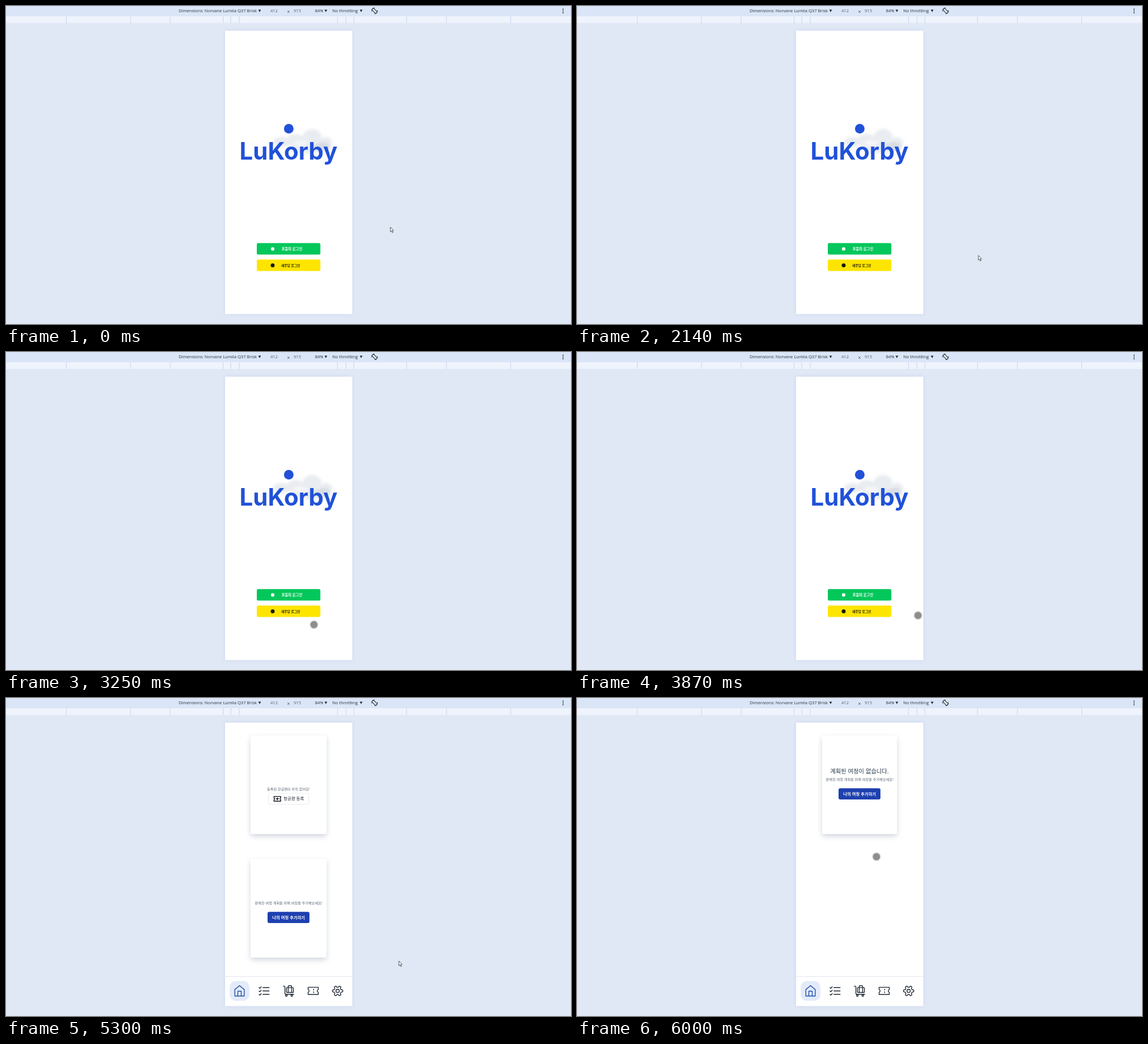
An HTML page for the animation above (6140 ms loop, 998 by 561 pixels).

```html
<!DOCTYPE html>
<html lang="ko">
<head>
<meta charset="utf-8">
<title>Travel app login</title>
<style>
  html, body { margin: 0; width: 100%; height: 100%; overflow: hidden; background: #e0e8f6; }
  svg { display: block; width: 100vw; height: 100vh; }
  text { font-family: "Noto Sans CJK KR", "Noto Sans CJK JP", sans-serif; }
  .bar text { font: 7.6px "Open Sans", "Noto Sans", sans-serif; fill: #2b3038; }
  .bar .dim { fill: #585d66; }
  .mid { text-anchor: middle; }
  .brand { font: 700 42px Inter, sans-serif; fill: #2051d8; text-anchor: middle; }
  .login { font-weight: 700; }
  .note { font-size: 6.22px; fill: #596473; text-anchor: middle; }
  .title { font-size: 10.3px; font-weight: 500; fill: #26364a; text-anchor: middle; }
  .cta { font-size: 7.3px; font-weight: 700; fill: #fff; text-anchor: middle; }
  .card { fill: #fff; filter: drop-shadow(0 4px 5px rgba(90, 108, 135, .28)); }
  .phone { fill: #fff; filter: drop-shadow(0 0 3px rgba(70, 100, 160, .13)); }
  .icon { fill: none; stroke: #1f2733; stroke-width: 1.4; stroke-linecap: round; stroke-linejoin: round; }
  .icon .on { stroke: #1f4ea6; }
  .cloud { filter: blur(2.6px); }
</style>
</head>
<body>
<svg viewBox="0 0 998 561" preserveAspectRatio="none">
  <defs>
    <path id="caret" d="M-2.4-2H2.4L0 2.2Z" fill="#23272e"/>
    <path id="ticket" d="M-9-6.3H9V-2.4a2.5 2.5 0 0 0 0 4.8V6.3H-9V2.4a2.5 2.5 0 0 0 0-4.8Z"/>
  </defs>

  <rect width="998" height="561" fill="#e0e8f6"/>
  <g class="bar">
    <rect width="998" height="18" fill="#dae6f7"/>
    <rect y="18" width="998" height="12" fill="#eff3fc"/>
    <path id="ticks" stroke="#c9d6ec" fill="none"/>
    <text x="305" y="11.3">Dimensions: Norvane Lumila Q37 Brisk</text>
    <text class="dim" x="467" y="11.3">412</text>
    <path d="M497 8l4 4m0-4l-4 4" stroke="#4c525b" stroke-width=".8"/>
    <text class="dim" x="508" y="11.3">915</text>
    <text x="545.7" y="11.3">84%</text>
    <text x="576.3" y="11.3">No throttling</text>
    <use href="#caret" x="448" y="8.5"/>
    <use href="#caret" x="565" y="8.5"/>
    <use href="#caret" x="627.3" y="8.5"/>
    <g transform="translate(651 8.5)" fill="none" stroke="#2f343c" stroke-width="1.1">
      <rect x="-2.2" y="-5" width="4.4" height="10" rx="1" transform="rotate(-45)"/>
      <path d="M-5 1A5.2 5.2 0 0 1 0-5.2M5-1A5.2 5.2 0 0 1 0 5.2"/>
    </g>
    <g fill="#23272e">
      <circle cx="984" cy="5.4" r="1"/><circle cx="984" cy="8.7" r="1"/><circle cx="984" cy="12" r="1"/>
    </g>
  </g>

  <rect class="phone" x="387" y="43.5" width="224.7" height="500"/>

  <g id="login">
    <g class="cloud">
      <g fill="#e9ecf0">
        <ellipse cx="487" cy="240" rx="15" ry="9"/>
        <ellipse cx="512" cy="237" rx="16" ry="11"/>
        <ellipse cx="541" cy="230" rx="16" ry="13"/>
        <ellipse cx="565" cy="241" rx="11" ry="10"/>
        <ellipse cx="535" cy="251" rx="32" ry="9"/>
      </g>
      <ellipse cx="559" cy="248" rx="14" ry="8" fill="#d7dce2"/>
      <ellipse cx="519" cy="242" rx="12" ry="5" fill="#f5f6f8"/>
    </g>
    <circle cx="499.5" cy="216.5" r="8.5" fill="#2051d8"/>
    <text class="brand" x="499" y="270.5">LuKorby</text>
    <rect x="443" y="418.3" width="112.3" height="20.3" rx="2.5" fill="#04c75b"/>
    <circle cx="471" cy="428.5" r="3.1" fill="#fff"/>
    <text class="login" x="486.7" y="430.7" font-size="6.3" fill="#fff">포들미 로그인</text>
    <rect x="443" y="447.3" width="112.3" height="20.2" rx="2.5" fill="#fee500"/>
    <circle cx="471" cy="457.6" r="3.5" fill="#1c1a06"/>
    <text class="login" x="486" y="459.5" font-size="5.8" fill="#2c2806">새루담 로그인</text>
  </g>

  <g id="home">
    <g id="flight">
      <rect class="card" x="432" y="66" width="134.3" height="174" rx="3"/>
      <text class="note" x="499" y="163.4">등록된 항공편이 아직 없어요!</text>
      <rect x="463.5" y="168" width="71.3" height="19.6" rx="3" fill="#fff" stroke="#e4e8ee" stroke-width=".9"/>
      <g class="icon" transform="translate(479.3 177.8) scale(.66)" style="stroke:#10151c;stroke-width:2.1">
        <use href="#ticket"/><path d="M-3 0H3M0-3V3"/>
      </g>
      <text x="490.3" y="180.3" font-size="7.4" font-weight="500" fill="#18202b">항공편 등록</text>
    </g>
    <g id="trip">
      <rect id="tripCard" class="card" y="66" height="174" rx="3"/>
      <text id="tripTitle" class="title" x="499" y="133.2">계획된 여정이 없습니다.</text>
      <text class="note" x="499.3" y="146">완벽한 여행 계획을 위해 여정을 추가해보세요!</text>
      <rect x="462" y="159.2" width="74" height="19.8" rx="3" fill="#1e40af"/>
      <text class="cta" x="499.2" y="171.7">나의 여정 추가하기</text>
    </g>
    <path d="M387 491.2H611.7" stroke="#dfe4ec"/>
    <rect x="395" y="499.3" width="35" height="35" rx="11" fill="#e3ebfa"/>
    <g class="icon">
      <path class="on" transform="translate(412.5 516.7)" d="M-8.3 9V-2.3L0-9.3 8.3-2.3V9ZM-3 9V.6H3V9"/>
      <path transform="translate(455.8 516.7)" d="M-2-6H9M-2 0H9M-2 6H9M-8.8-5.7l1.3 1.3 2.6-2.8M-8.8.3l1.3 1.3 2.6-2.8M-8.8 6.3l1.3 1.3 2.6-2.8"/>
      <g transform="translate(499 516.7)">
        <path d="M-9.2-8.3h1.6q1.2 0 1.2 1.2V4q0 2 2 2H9.2M-.5-5.8V-8q0-1.2 1.2-1.2h3.6q1.2 0 1.2 1.2v2.2M-.5-5.8V2.8M5.5-5.8V2.8"/>
        <rect x="-3.6" y="-5.8" width="12.2" height="8.6" rx="1"/>
        <circle cx="-3.8" cy="8" r="1.5"/><circle cx="5.8" cy="8" r="1.5"/>
      </g>
      <g transform="translate(542.6 516.7)">
        <use href="#ticket"/><path d="M.8-3V-1.6M.8 1.6V3"/>
      </g>
      <g transform="translate(585.8 516.7)"><path id="gear"/><circle r="2.9"/></g>
    </g>
  </g>

  <g id="touch">
    <circle r="7.4" fill="#c6c6c6"/><circle r="6" fill="#8d8d8d"/>
  </g>
  <path id="arrow" d="M0 0V8.3L1.9 6.6 3.3 9.8 4.7 9.2 3.3 6.1H5.6Z" fill="#fff" stroke="#2b2e35" stroke-width=".8" stroke-linejoin="round"/>
</svg>

<script>
const LOOP = 6140, HOME_AT = 5300, TRIP_AT = 5440;
const PHONE = { left: 387, right: 611, top: 43, bottom: 544 };
// pointer stops: time, x, y
const stops = [
  [0, 679, 390], [200, 679, 390], [750, 707, 394], [820, 707, 394],
  [960, 598, 424], [1100, 598, 424], [1650, 536, 430],
  [2140, 709, 440], [2280, 707, 447], [2350, 707, 447],
  [2840, 538, 502], [2970, 538, 502], [3250, 544, 481], [3460, 530, 466],
  [3590, 530, 466], [4200, 694, 463], [5230, 694, 463], [5300, 694, 464],
  [5860, 602, 422], [6000, 529, 280], [LOOP, 529, 280]
];
const el = id => document.getElementById(id);
const [login, home, flight, trip, tripCard, tripTitle, touch, arrow] =
  ["login", "home", "flight", "trip", "tripCard", "tripTitle", "touch", "arrow"].map(el);
const show = (node, on) => node.setAttribute("visibility", on ? "inherit" : "hidden");

el("ticks").setAttribute("d",
  [106.5, 220, 290, 383.5, 397, 412, 585.5, 600.5, 614.5, 707.5, 778, 891.5]
    .map(x => `M${x} 18V30`).join(""));

el("gear").setAttribute("d", "M" + Array.from({ length: 72 }, (_, i) => {
  const a = i * Math.PI / 36;
  const r = 7.7 + Math.max(-1.4, Math.min(1.4, 2.4 * Math.cos(6 * a)));
  return `${(r * Math.cos(a)).toFixed(2)} ${(r * Math.sin(a)).toFixed(2)}`;
}).join("L") + "Z");

function pointerAt(t) {
  const i = stops.findIndex(s => s[0] > t);
  const [t0, x0, y0] = stops[i - 1], [t1, x1, y1] = stops[i];
  const p = (t - t0) / (t1 - t0), e = p * p * (3 - 2 * p);
  return [x0 + (x1 - x0) * e, y0 + (y1 - y0) * e];
}

function draw(t) {
  const atHome = t >= HOME_AT, tripOnly = t >= TRIP_AT;
  show(login, !atHome);
  show(home, atHome);
  show(flight, !tripOnly);
  show(tripTitle, tripOnly);
  trip.setAttribute("transform", `translate(0 ${tripOnly ? 0 : 218})`);
  tripCard.setAttribute("x", tripOnly ? 433 : 432);
  tripCard.setAttribute("width", tripOnly ? 132.3 : 134.3);

  const [x, y] = pointerAt(t);
  const inside = x > PHONE.left && x < PHONE.right && y > PHONE.top && y < PHONE.bottom;
  show(touch, inside);
  show(arrow, !inside);
  (inside ? touch : arrow).setAttribute("transform", `translate(${x} ${y})`);
}

const start = performance.now();
function tick() {
  draw((performance.now() - start) % LOOP);
  requestAnimationFrame(tick);
}
tick();
</script>
</body>
</html>
```
